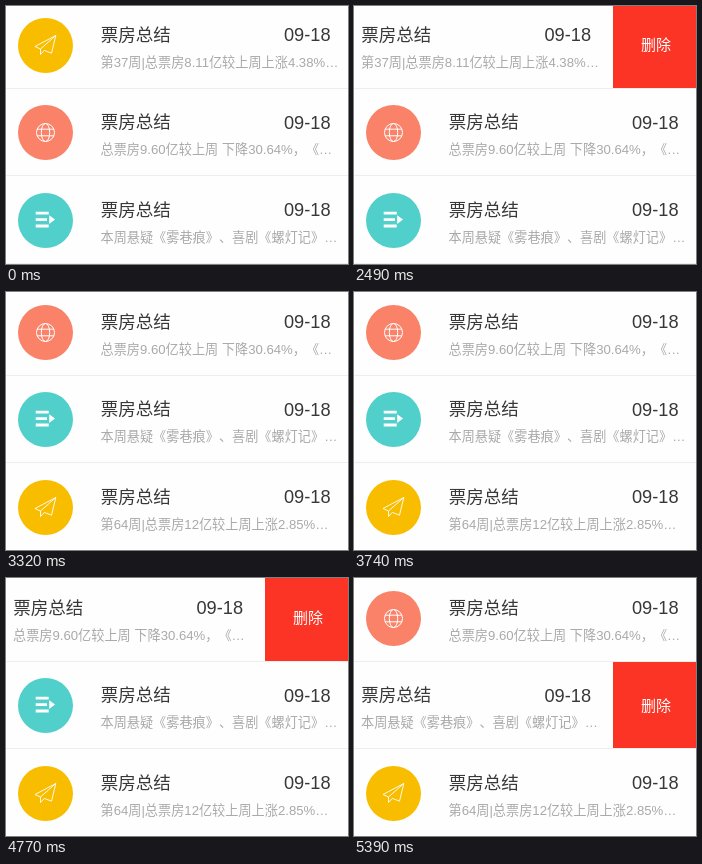
These frames come from a looping animation (342x258 px, 5490 ms). An HTML page:

```html
<!DOCTYPE html>
<html lang="zh-CN">
<head>
<meta charset="utf-8">
<title>滑动删除</title>
<style>
  html, body { margin: 0; width: 100%; height: 100%; overflow: hidden; background: #fefefe; }
  body {
    font-family: "Liberation Sans", "Noto Sans CJK SC", "Noto Sans CJK", sans-serif;
    line-height: 20px;
    white-space: nowrap;
    text-spacing-trim: space-all;
  }
  .stage { position: relative; width: 342px; height: 258px; overflow: hidden; }

  .row {
    --y: calc(var(--i) * 87.5px - 5px);
    position: absolute; left: 0; top: var(--y);
    width: 342px; height: 87.5px; overflow: hidden; background: #fefefe;
  }
  .row::after {
    content: ""; position: absolute; left: 0; right: 0; bottom: 0;
    height: 1px; background: #eee;
  }
  .delete, .cell { position: absolute; top: 0; bottom: 1px; }
  .delete { left: 259px; width: 83px; background: #fb3425; color: #fff; font-size: 15px; }
  .delete span { position: absolute; left: 28px; top: 34px; }
  .cell { left: 0; width: 346px; background: #fefefe; }
  .cell > * { position: absolute; margin: 0; font-weight: 400; }
  svg { left: 12px; top: 16.5px; width: 55px; height: 55px; fill: none; stroke: #fff; }
  .disc { fill: var(--c); stroke: none; }
  h2 { left: 94.8px; top: 23.5px; font-size: 17.5px; color: #383838; }
  time { left: 278px; top: 24.2px; font-size: 18.2px; color: #383838; }
  p { left: 94.5px; top: 51.5px; font-size: 13.17px; color: #a9a9a9; }

  /* rows below the deleted one close the gap */
  .up { animation: up 5490ms step-end infinite; }
  @keyframes up {
    0% { top: var(--y); }
    56.64% { top: calc(var(--y) - 24.5px); }
    60.47%, 100% { top: calc(var(--y) - 86.5px); }
  }

  /* each swipe overshoots, then rests at -87.5px */
  .cell { animation: 5490ms step-end infinite; }
  .first .cell { animation-name: swipe1; }
  .second .cell { animation-name: swipe2; }
  .third .cell { animation-name: swipe3; }
  @keyframes swipe1 {
    0% { left: 0; }
    26.41% { left: -89.5px; }
    30.23%, 100% { left: -87.5px; }
  }
  @keyframes swipe2 {
    0% { left: 0; }
    75.59% { left: -110.5px; }
    79.23% { left: -87.5px; }
    90.71% { left: -54px; }
    94.53%, 100% { left: 0; }
  }
  @keyframes swipe3 {
    0% { left: 0; }
    90.71% { left: -99.5px; }
    94.53%, 100% { left: -87.5px; }
  }
</style>
</head>
<body>
<svg width="0" height="0" style="position:absolute;width:0;height:0">
  <symbol id="plane" viewBox="0 0 55 55">
    <path d="M22.5 31 17 28.5 37.8 17.5 33.5 35.2 26.3 32.4M37.8 17.5 22.5 31V36.5L26.3 32.4" stroke-width=".9" stroke-linejoin="round"/>
  </symbol>
  <symbol id="globe" viewBox="0 0 55 55">
    <g stroke-width="1">
      <circle cx="27.5" cy="27.5" r="9"/>
      <ellipse cx="27.5" cy="27.5" rx="4.2" ry="9"/>
      <path d="M19.2 24.2H35.8M19.2 30.8H35.8"/>
    </g>
  </symbol>
  <symbol id="menu" viewBox="0 0 55 55">
    <path d="M17.7 20.2H30.7M17.7 26.6H29M17.7 33H30.7" stroke-width="2.8"/>
    <path d="M31.2 22.2 37 26.6 31.2 31Z" fill="#fff" stroke="none"/>
  </symbol>
</svg>

<div class="stage">
  <div class="row first" style="--i:0;--c:#f9bd00">
    <div class="delete"><span>删除</span></div>
    <div class="cell">
      <svg><circle class="disc" cx="27.5" cy="27.5" r="27.5"/><use href="#plane" width="55" height="55"/></svg>
      <h2>票房总结</h2><time>09-18</time>
      <p>第37周|总票房8.11亿较上周上涨4.38%…</p>
    </div>
  </div>
  <div class="row up second" style="--i:1;--c:#f98268">
    <div class="delete"><span>删除</span></div>
    <div class="cell">
      <svg><circle class="disc" cx="27.5" cy="27.5" r="27.5"/><use href="#globe" width="55" height="55"/></svg>
      <h2>票房总结</h2><time>09-18</time>
      <p>总票房9.60亿较上周 下降30.64%，《…</p>
    </div>
  </div>
  <div class="row up third" style="--i:2;--c:#51cfca">
    <div class="delete"><span>删除</span></div>
    <div class="cell">
      <svg><circle class="disc" cx="27.5" cy="27.5" r="27.5"/><use href="#menu" width="55" height="55"/></svg>
      <h2>票房总结</h2><time>09-18</time>
      <p>本周悬疑《雾巷痕》、喜剧《螺灯记》…</p>
    </div>
  </div>
  <div class="row up" style="--i:3;--c:#f9bd00">
    <div class="cell">
      <svg><circle class="disc" cx="27.5" cy="27.5" r="27.5"/><use href="#plane" width="55" height="55"/></svg>
      <h2>票房总结</h2><time>09-18</time>
      <p>第64周|总票房12亿较上周上涨2.85%…</p>
    </div>
  </div>
</div>
</body>
</html>
```
